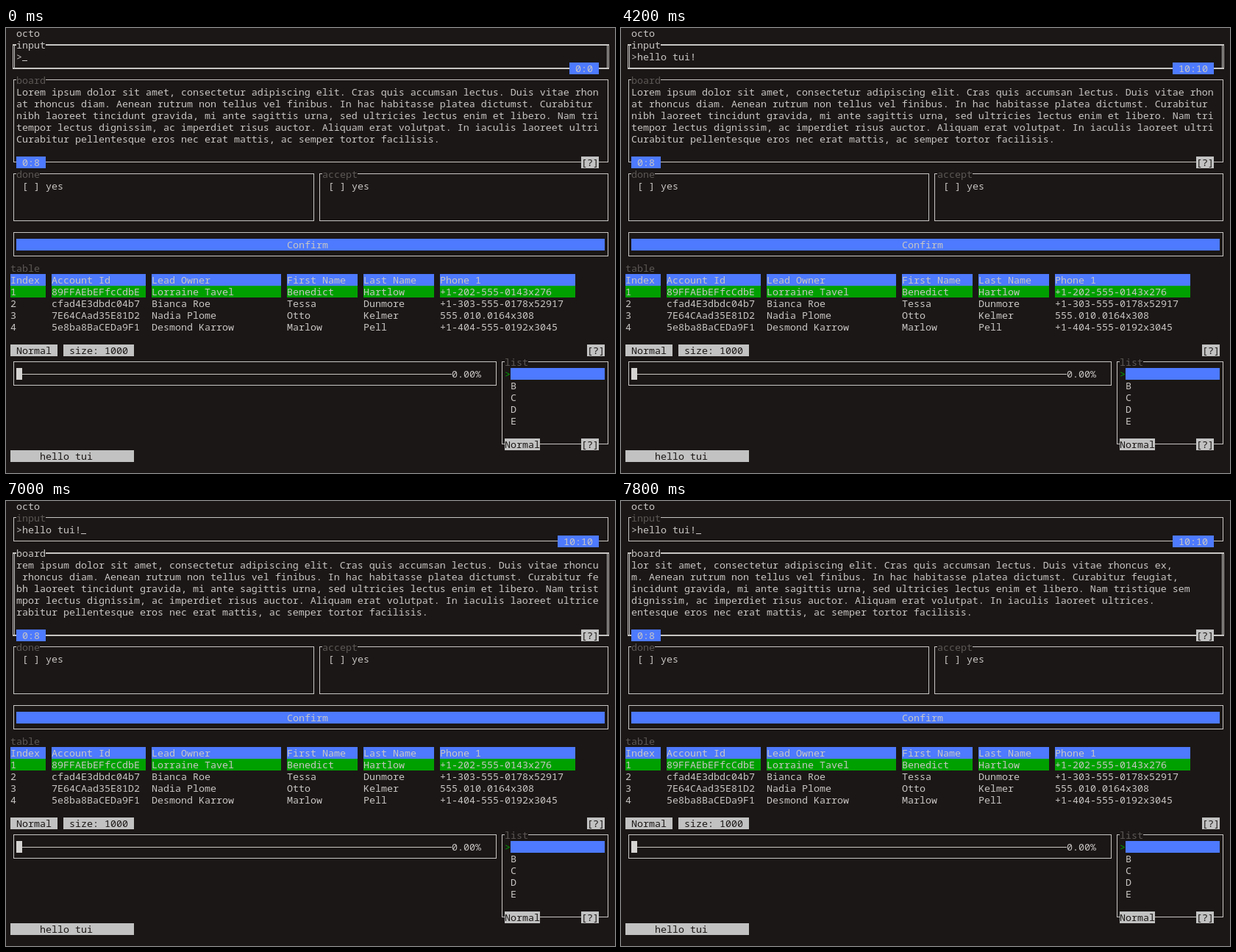
An HTML page that plays this animation: 828 px wide and 606 px high, repeating every 8 s.

```html
<!DOCTYPE html>
<html lang="en">
<head>
<meta charset="utf-8">
<title>octo</title>
<style>
html, body { margin: 0; width: 100%; height: 100%; overflow: hidden; background: #1b1716; }
svg { display: block; width: 828px; height: 606px; }
text {
  font: 13.333px "Noto Sans Mono", "DejaVu Sans Mono", monospace;
  font-variant-ligatures: none;
  white-space: pre;
}
</style>
</head>
<body>
<svg id="stage" viewBox="0 0 828 606"></svg>
<script>
const BG = '#1b1716', FG = '#c8c6c4', DIM = '#5c5856';
const BLUE = '#4d7aff', GREEN = '#00a000', GREY = '#c2c2c2';
const LOOP = 8000, VIEW = 99;

// Terminal grid: 8 x 16 pixel cells
const X = col => 6 + 8 * col;
const Y = row => 16 * row - 1;

const rect = (x, y, w, h, fill) =>
  `<rect x="${x}" y="${y}" width="${w}" height="${h}" fill="${fill}"/>`;
const fillCells = (col, row, n, fill) => rect(X(col), Y(row), 8 * n, 16, fill);
const text = (col, row, s, fill = FG, extra = '') =>
  `<text x="${X(col)}" y="${Y(row) + 13}" fill="${fill}" ${extra}>` +
  s.replace(/&/g, '&amp;').replace(/</g, '&lt;') + '</text>';
const badge = (col, row, s, fill = GREY, ink = BG) =>
  fillCells(col, row, s.length, fill) + text(col, row, s, ink);
const blueBadge = (col, row, s) => badge(col, row, s, BLUE, FG);

function box(c0, r0, c1, r1, title = '', focused = false) {
  const x0 = X(c0) + 4, x1 = X(c1) + 4, y0 = Y(r0) + 7, y1 = Y(r1) + 7;
  const d = focused ? 1 : 0, thick = 1 + d;
  const w = x1 - x0 + 1 + 2 * d, h = y1 - y0 + thick;
  let s = rect(x0 - d, y0, w, thick, FG) + rect(x0 - d, y1, w, thick, FG);
  for (const x of focused ? [x0 - 1, x0 + 1, x1 - 1, x1 + 1] : [x0, x1])
    s += rect(x, y0, 1, h, FG);
  if (title) s += badge(c0 + 1, r0, title, BG, focused ? FG : DIM);
  return s;
}

const board = [
  'Lorem ipsum dolor sit amet, consectetur adipiscing elit. Cras quis accumsan lectus. Duis vitae rhoncus ex,',
  'at rhoncus diam. Aenean rutrum non tellus vel finibus. In hac habitasse platea dictumst. Curabitur feugiat,',
  'nibh laoreet tincidunt gravida, mi ante sagittis urna, sed ultricies lectus enim et libero. Nam tristique sem',
  'tempor lectus dignissim, ac imperdiet risus auctor. Aliquam erat volutpat. In iaculis laoreet ultrices.',
  'Curabitur pellentesque eros nec erat mattis, ac semper tortor facilisis.'
];

// Column start and width in cells
const columns = [[0, 6], [7, 16], [24, 22], [47, 12], [60, 12], [73, 23]];
const table = [
  ['Index', 'Account Id', 'Lead Owner', 'First Name', 'Last Name', 'Phone 1'],
  ['1', '89FFAEbEFfcCdbE', 'Lorraine Tavel', 'Benedict', 'Hartlow', '+1-202-555-0143x276'],
  ['2', 'cfad4E3dbdc04b7', 'Bianca Roe', 'Tessa', 'Dunmore', '+1-303-555-0178x52917'],
  ['3', '7E64CAad35E81D2', 'Nadia Plome', 'Otto', 'Kelmer', '555.010.0164x308'],
  ['4', '5e8ba8BaCEDa9F1', 'Desmond Karrow', 'Marlow', 'Pell', '+1-404-555-0192x3045']
];

function drawTable() {
  return table.map((cells, i) => cells.map((s, j) => {
    const [col, width] = columns[j];
    return badge(col, 21 + i, s.padEnd(width), [BLUE, GREEN][i] || BG, FG);
  }).join('')).join('');
}

const fixed =
  text(1, 0, 'octo', FG, 'font-weight="700"') +
  box(0, 12, 51, 16, 'done') + text(2, 13, '[ ] yes') +
  box(52, 12, 101, 16, 'accept') + text(54, 13, '[ ] yes') +
  box(0, 17, 101, 19) + fillCells(1, 18, 100, BLUE) + text(47, 18, 'Confirm') +
  text(0, 20, 'table', DIM) + drawTable() +
  badge(0, 27, ' Normal ') + badge(9, 27, ' size: 1000 ') + badge(98, 27, '[?]') +
  box(0, 28, 82, 30) + fillCells(1, 29, 1, '#d6d4d2') +
  rect(X(2), Y(29) + 8, 584, 1, FG) + text(75, 29, '0.00%') +
  box(83, 28, 101, 35, 'list') + text(84, 29, '>', GREEN) + fillCells(85, 29, 16, BLUE) +
  [...'BCDE'].map((s, i) => text(85, 30 + i, s)).join('') +
  badge(84, 35, 'Normal') + badge(97, 35, '[?]') +
  badge(0, 36, '     hello tui       ');

// [time, value] pairs; each value holds until the next one
const typed = [[0, 0], [2100, 1], [2400, 2], [2600, 3], [2800, 4], [2900, 5],
  [3200, 6], [3400, 8], [3600, 9], [3900, 10]];
const scroll = [[0, 0], [6400, 1], [7000, 2], [7100, 4], [7200, 6], [7300, 9],
  [7400, 11], [7500, 13], [7600, 15], [7800, 14]];
const valueAt = (steps, t) => steps.filter(([at]) => at <= t).pop()[1];

function cursorOn(t) {
  const drift = t >= 6700 ? 100 : 0;
  const phase = t >= 6700 ? t - 6800 : t - 200;
  if (drift && phase < 0) return false;
  return Math.floor(phase / 500) % 2 === (drift ? 0 : -1) || (!drift && Math.floor(phase / 500) % 2 === 1);
}

function drawInput(t, focused) {
  const n = valueAt(typed, t), count = ` ${n}:${n} `;
  return box(0, 1, 101, 3, 'input', focused) +
    text(1, 2, '>' + 'hello tui!'.slice(0, n)) +
    (cursorOn(t) ? rect(X(2 + n), 44, 7, 1, FG) : '') +
    blueBadge(100 - count.length, 3, count);
}

function drawBoard(t, focused) {
  const from = valueAt(scroll, t);
  return box(0, 4, 101, 11, 'board', focused) +
    board.map((s, i) => text(1, 5 + i, s.slice(from, from + VIEW))).join('') +
    blueBadge(1, 11, ' 0:8 ') + badge(97, 11, '[?]');
}

const stage = document.getElementById('stage');
stage.innerHTML = rect(0, 0, 828, 606, BG) + fixed + '<g id="live"></g>';
const live = document.getElementById('live');
let shown = '';

function render(t) {
  const onBoard = t >= 5700;
  const next = drawInput(t, !onBoard) + drawBoard(t, onBoard);
  if (next !== shown) live.innerHTML = shown = next;
}

const start = performance.now();
function tick() {
  render((performance.now() - start) % LOOP);
  requestAnimationFrame(tick);
}
tick();
</script>
</body>
</html>
```
